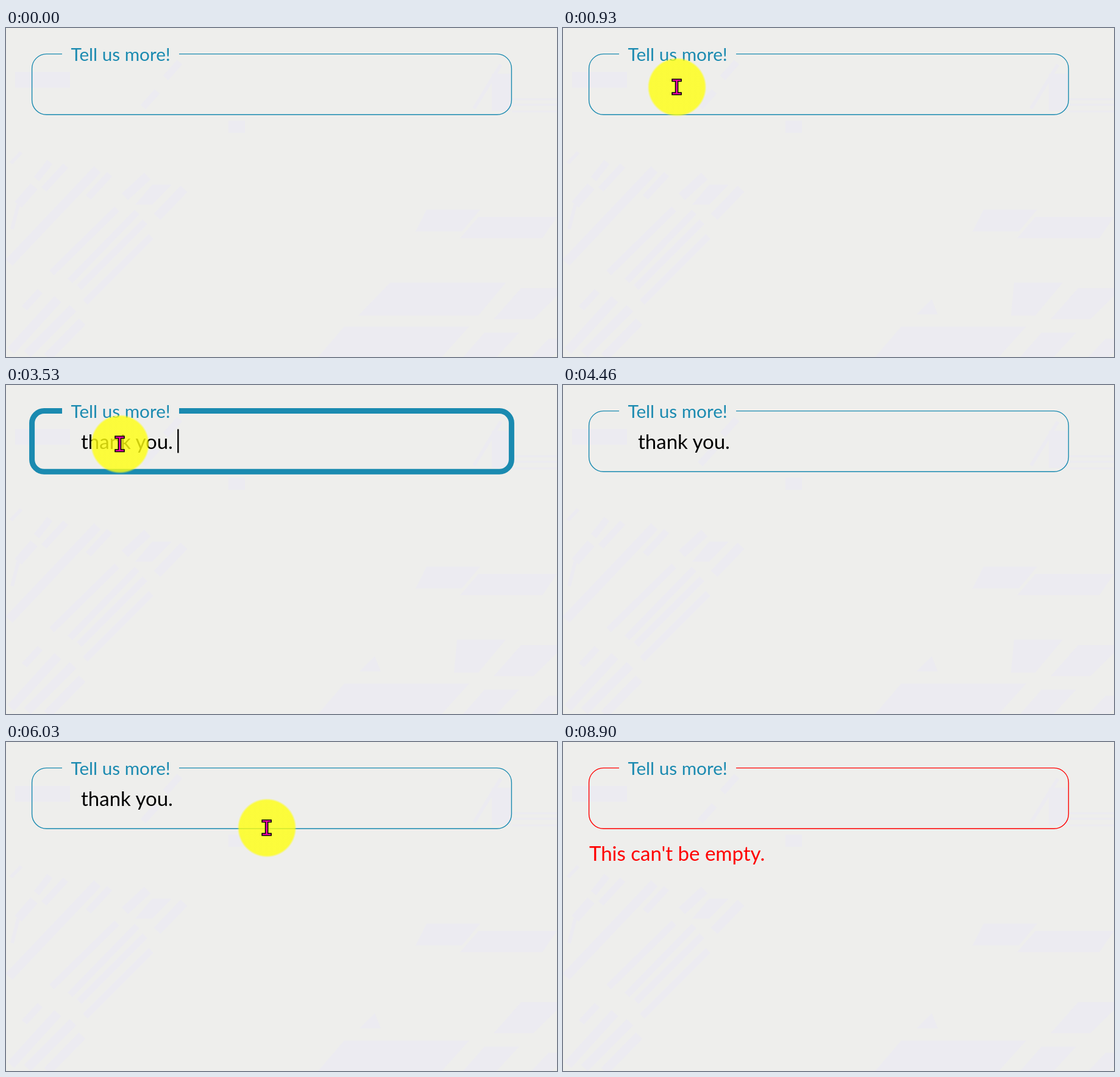
An HTML page that plays this animation: 904 px wide and 540 px high, repeating every 9260 ms.

```html
<!DOCTYPE html>
<html lang="en">
<head>
<meta charset="utf-8">
<title>Form field</title>
<style>
  html, body { margin: 0; width: 100%; height: 100%; overflow: hidden; background: #eeeeec; }
  svg { display: block; }
  text { font-family: Lato, sans-serif; font-size: 33px; white-space: pre; }
  #backdrop { fill: none; stroke: #ecebf1; }
  #backdrop .solid { fill: #ecebf1; stroke: none; }
  #pointer path { stroke: #000; stroke-width: 1.6; fill: #ff00b4; }
</style>
</head>
<body>
<svg width="904" height="540" viewBox="0 0 904 540">
  <defs>
    <radialGradient id="glow">
      <stop offset=".93" stop-color="#ffff0f" stop-opacity=".8"/>
      <stop offset="1" stop-color="#ffff0f" stop-opacity="0"/>
    </radialGradient>
  </defs>

  <g id="backdrop">
    <path stroke-width="15" d="M5 385L150 232M195 277L232 243M248 310L292 264M20 290L46 260M8 530L85 445M35 535L110 460M68 540L125 482"/>
    <path stroke-width="11" d="M75 402L182 297M105 415L215 302M120 426L228 318M130 450L238 342M50 248L72 220M62 265L98 226M135 278L170 240M30 460L56 432M225 130L248 104M262 82L285 56"/>
    <path stroke-width="6" d="M10 330L20 290M8 222L25 204M768 132L812 60"/>
    <path stroke-width="3" d="M830 117H904M830 126H904M830 137H904"/>
    <path class="solid" d="M212 290L240 257H272L240 290ZM15 72H105V98H15ZM365 152H392V172H365ZM797 75H828V136H797Z"/>
    <path class="solid" d="M690 298H778L748 334H672ZM775 310H904L880 345H745ZM845 427H904V440L865 478H800ZM555 490H760L715 540H512ZM785 500H842L805 540H750ZM890 510H904V532L895 540H862Z"/>
    <path class="solid" id="slab"/>
  </g>

  <path id="border" fill="none"/>
  <text x="106.5" y="54" fill="#1a8ab0" style="font-size:29.7px">Tell us more!</text>
  <text id="value" x="123" y="104.5"></text>
  <rect id="caret" y="72.5" width="2.4" height="39"/>
  <text id="error" x="43" y="195.3" fill="#f00">This can't be empty.</text>

  <g id="pointer">
    <circle r="48.5" fill="url(#glow)"/>
    <path id="arrow" d="M.5 1V25L6 19.5L10 27.5L14 25.5L10.5 18.5H18Z"/>
    <path id="beam" d="M-8-13H7V-9.5H1.5V9H7V12.5H-8V9H-2.5V-9.5H-8Z"/>
  </g>
</svg>

<script>
const LOOP = 9260, TICK = 100 / 3, TEAL = '#1a8ab0';
const $ = id => document.getElementById(id);
const show = (id, on) => $(id).setAttribute('visibility', on ? 'visible' : 'hidden');

// [time, text, caret: 1 on, 0 off, or a fixed x]
const typing = [
  [0, '', 0], [1430, '', 126.5], [1630, '', 123], [1930, '', 0],
  [2230, 't', 1], [2400, 'th', 1], [2490, 'tha', 1], [2570, 'than', 1], [2660, 'thank', 1],
  [2800, 'thank ', 1], [2960, 'thank y', 1], [3030, 'thank yo', 1], [3100, 'thank you', 1],
  [3360, 'thank you.', 1], [3530, 'thank you. ', 1], [3860, 'thank you. ', 0],
  [4160, 'thank you. ', 1], [4460, 'thank you. ', 0],
  [6300, 'thank you. ', 1], [6630, 'thank you. ', 0], [6960, 'thank you.', 1],
  [7130, 'thank you', 1], [7200, 'thank y', 1], [7230, 'thank', 1], [7260, 'tha', 1],
  [7300, 't', 1], [7330, '', 0], [7560, '', 118], [7860, '', 0]
];

function pointerAt(t) {
  const q = Math.floor((t + 7) / TICK) * TICK;   // the pointer moves at 30 steps a second
  const glide = (x0, y0, x1, y1, u, bow = 0) =>
    [x0 + (x1 - x0) * u, y0 + (y1 - y0) * u + 4 * bow * u * (1 - u)];
  const slow = (start, length, power) =>
    1 - Math.pow(1 - Math.min(1, Math.max(0, (q - start) / length)), power);

  if (t < 400) return null;
  if (t < 4160) return glide(866, 570, 187, 97, slow(400, 560, 3.14), 26);
  if (t < 4200) return [256, 121];
  if (t < 5560) return null;
  if (t < 8800) return glide(851, 552, 389, 103, slow(5566, 567, 1.42));
  if (t < 8900) return glide(389, 103, 904, 540, (q - 8766) / 133);
  return null;
}

function drawBorder(focused, colour) {
  const r = focused ? 20 : 24, arc = (x, y) => `a${r} ${r} 0 0 1 ${x} ${y}`;
  const border = $('border');
  border.setAttribute('d', `M284 42.6H${829.4 - r}${arc(r, r)}V${142.3 - r}${arc(-r, r)}` +
    `H${42.6 + r}${arc(-r, -r)}V${42.6 + r}${arc(r, -r)}H92`);
  border.setAttribute('stroke', colour);
  border.setAttribute('stroke-width', focused ? 9 : 1.4);
}

function draw(t) {
  const failed = t >= 8060;
  drawBorder(t >= 1430 && t < 4460 || t >= 6300 && t < 8030, failed ? '#f00' : TEAL);
  show('error', failed);

  const [, text, caret] = typing.findLast(step => step[0] <= t);
  const value = $('value');
  value.textContent = text;
  show('caret', caret);
  $('caret').setAttribute('x', (caret > 1 ? caret : 123 + value.getComputedTextLength()) - 1.2);

  $('slab').setAttribute('d', t < 500
    ? 'M630 418H820L775 472H578Z'
    : t < 5700 ? 'M740 418H820L775 472H735ZM605 445L615 470H580Z' : 'M605 445L615 470H580Z');

  const at = pointerAt(t), inside = at && at[1] < 142;
  show('pointer', at);
  show('arrow', at && !inside);
  show('beam', inside);
  if (at) $('pointer').setAttribute('transform', `translate(${at})`);
}

const start = performance.now();
function frame() {
  draw((performance.now() - start) % LOOP);
  requestAnimationFrame(frame);
}
frame();
</script>
</body>
</html>
```
